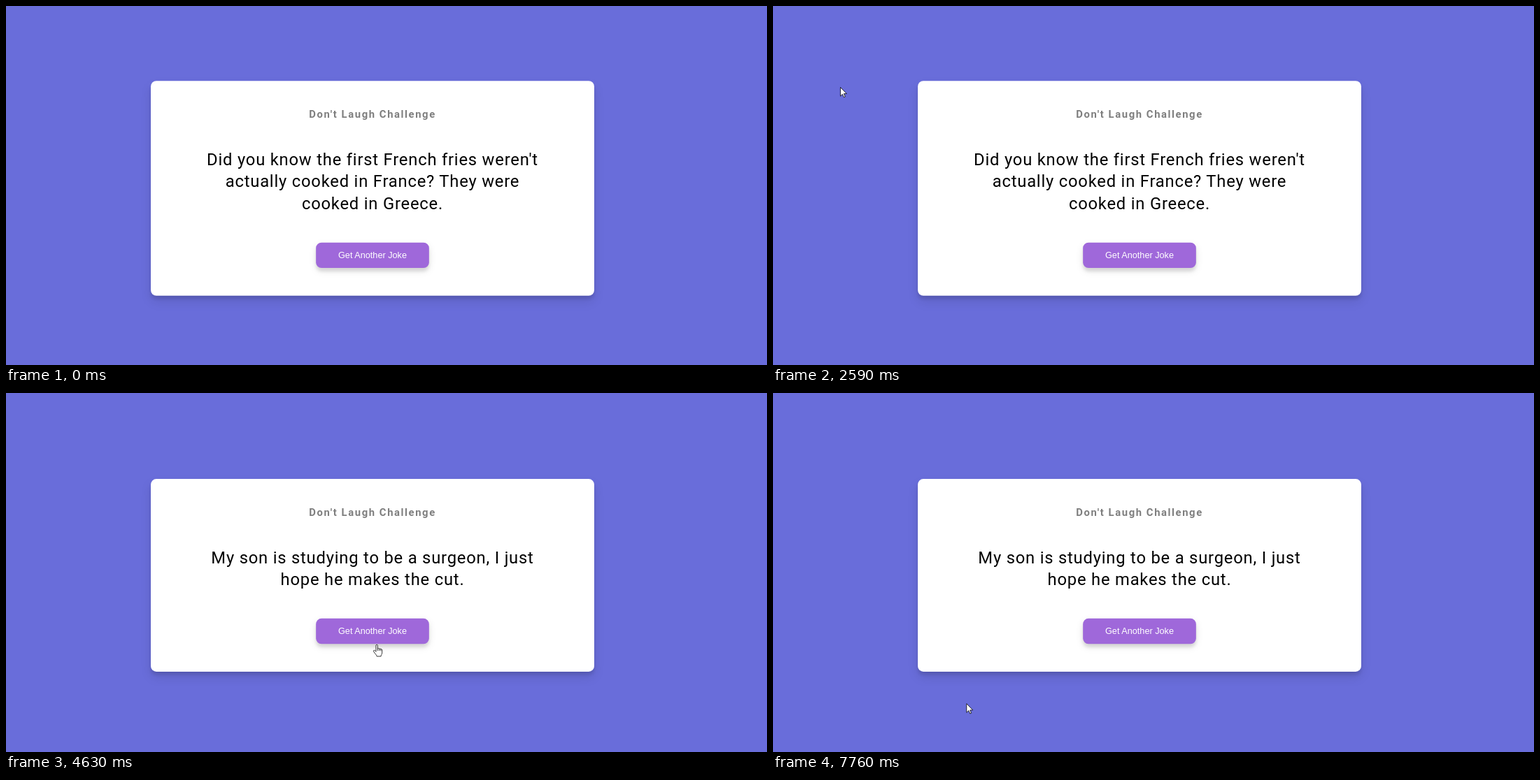
Write an HTML page that moves like this. It is 1088 px wide and 514 px high and loops after 8 s.

```html
<!DOCTYPE html>
<html lang="en">
<head>
<meta charset="utf-8">
<title>Don't Laugh Challenge</title>
<style>
  html, body { margin: 0; width: 100%; height: 100%; overflow: hidden; }
  body { position: relative; background: #696dda; font-family: Roboto, sans-serif; }
  .card {
    position: absolute; left: 523.9px; top: 261px; width: 800px; box-sizing: border-box;
    padding: 50px 20px; border-radius: 10px; background: #fff; text-align: center;
    box-shadow: 0 10px 20px rgba(0,0,0,.1), 0 6px 6px rgba(0,0,0,.1);
    transform: scale(.7925) translate(-50%, -50%); transform-origin: 0 0;
  }
  h3 { margin: 0; font-size: 18.72px; line-height: 22px; letter-spacing: 2px; opacity: .5; }
  #joke { margin: 50px auto; font-size: 30px; line-height: 40px; letter-spacing: 1px; white-space: pre; }
  button {
    display: block; margin: 0 auto; padding: 14px 40px; border: 0; border-radius: 10px;
    background: #9f68da; color: #fff; font: 16px/18px "Liberation Sans", Arial, sans-serif;
    box-shadow: 0 5px 15px rgba(0,0,0,.1), 0 6px 6px rgba(0,0,0,.1);
  }
  svg { position: absolute; left: 0; top: 0; width: 100%; height: 100%; }
  svg path { fill: #fff; stroke: #000; stroke-linejoin: round; }
</style>
</head>
<body>
<div class="card">
  <h3>Don't Laugh Challenge</h3>
  <div id="joke"></div>
  <button id="btn">Get Another Joke</button>
</div>
<svg>
  <path id="arrow" d="M.5 .5V16.5L4.2 13l2.5 5.5 2.4-1-2.4-5.4h5z"/>
  <path id="hand" d="M5.5 13V2a1.5 1.5 0 0 1 3 0V8c0-1.5 3-1.5 3 .5 0-1.5 2.7-1.3 2.7.8 0-1.4 2.3-1.2 2.3.7v5c0 3-2 3.5-2 6.5H7c0-2.5-4-5.5-5.5-8.5-1.5-2.2 1-3 2-2zM8.5 8v3.5M11.5 8.5v3M14.2 9.3v2.5"/>
</svg>
<script>
const LOOP = 8000;
const $ = id => document.getElementById(id);
const jokes = [
  "Did you know the first French fries weren't\nactually cooked in France? They were\ncooked in Greece.",
  "My son is studying to be a surgeon, I just\nhope he makes the cut."
];

// Pointer jumps: [start ms, shape, x, y]; no shape means hidden
const pointer = [
  [0],
  [1340, "hand", 526, 363],
  [2590, "arrow", 96, 116],
  [3660],
  [4320, "hand", 524.6, 360],
  [5140, "hand", 522.3, 352],
  [6040, "arrow", 528.4, 298],
  [6960],
  [7110, "arrow", 75, 79],
  [7200, "arrow", 125, 165],
  [7290, "arrow", 188, 259],
  [7430, "arrow", 360, 176],
  [7760, "arrow", 276.4, 444.4]
];

function draw(t) {
  const joke = jokes[t < 4630 ? 0 : 1];
  if ($("joke").textContent !== joke) $("joke").textContent = joke;

  const pressed = t >= 4320 && t < 4470;
  $("btn").style.transform = pressed ? "scale(.98)" : "none";

  const [, shape, x, y] = pointer.findLast(p => p[0] <= t);
  for (const id of ["arrow", "hand"]) {
    $(id).style.display = id === shape ? "inline" : "none";
    if (id === shape) $(id).setAttribute("transform", `translate(${x} ${y}) scale(.7925)`);
  }
}

const start = performance.now();
function tick() {
  draw((performance.now() - start) % LOOP);
  requestAnimationFrame(tick);
}
tick();
</script>
</body>
</html>
```
